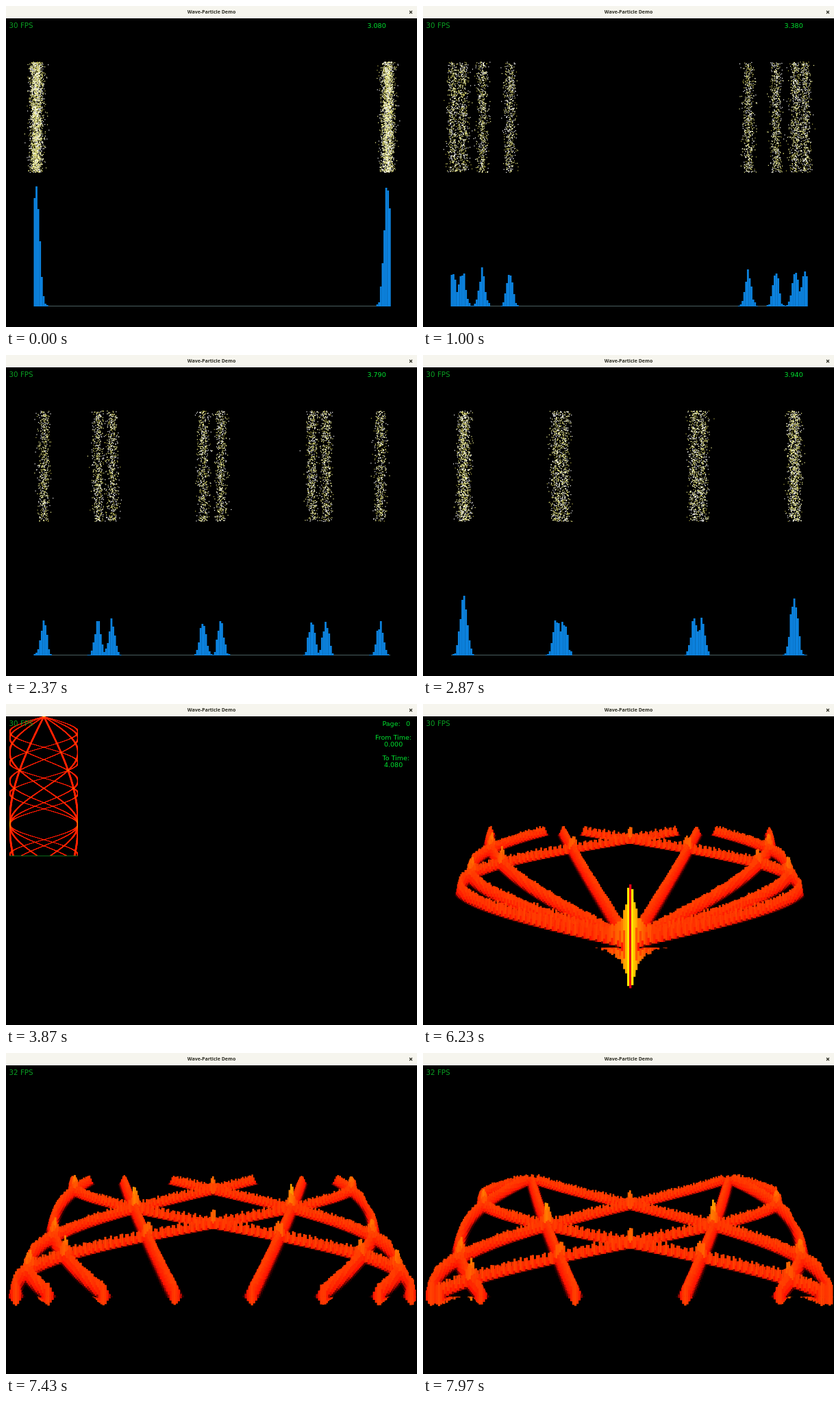
Write an HTML page with a canvas that moves like this. It is 600 by 468 pixels and loops after 8 s.

```html
<!DOCTYPE html>
<html lang="en">
<head>
<meta charset="utf-8">
<title>Wave-Particle Demo</title>
<style>
  html, body { margin: 0; width: 100%; height: 100%; overflow: hidden; background: #000; }
  canvas { display: block; }
</style>
</head>
<body>
<canvas id="stage" width="600" height="468"></canvas>
<script>
const ctx = document.getElementById('stage').getContext('2d');
const LOOP = 8000, FRAME = 1000 / 30;
const PAGE_START = 101, RELIEF_START = 187;   // frames at which the view switches
const MODES = [0.5, 1.5, 2.5, 3.5];
const BINS = 200, PAGE_ROWS = 408, RELIEF_ROWS = 99;
const LIME = '#0a9c22', GREEN = '#00e430';

function randomizer(seed) {
  let a = seed * 2654435761 | 0;
  return () => {
    a = a + 0x6D2B79F5 | 0;
    let t = Math.imul(a ^ a >>> 15, a | 1);
    t ^= t + Math.imul(t ^ t >>> 7, t | 61);
    return ((t ^ t >>> 14) >>> 0) / 4294967296;
  };
}

// Positions of the eight streams at time t, in the range -1 to 1
const streams = t => MODES.flatMap(k => [-Math.sin(k * t), Math.sin(k * t)]);

// Density over all bins for one time row; a lone stream peaks near 1
const rowCache = [];
function densityRow(row) {
  if (rowCache[row]) return rowCache[row];
  const centers = streams(row * 0.01), random = randomizer(row + 900);
  return rowCache[row] = Array.from({ length: BINS }, (_, b) => {
    const u = (b - BINS / 2) / (BINS / 2);
    let sum = 0;
    for (const c of centers) sum += Math.exp(-(((u - c) / 0.016) ** 2) / 2);
    return sum * (0.9 + 0.2 * random());
  });
}

function heat(density) {
  if (density > 7.3) return '#e60018';
  const light = Math.min(1, density / 0.25);
  const green = 255 * Math.tanh(density / 4);
  return `rgb(${255 * light | 0},${green * light | 0},0)`;
}

function text(string, x, y, color, size = 9.5) {
  ctx.font = `${size}px "DejaVu Sans", sans-serif`;
  ctx.textAlign = 'left';
  ctx.fillStyle = color;
  ctx.fillText(string, x, y);
}

function titleBar() {
  ctx.fillStyle = '#f6f5ee';
  ctx.fillRect(0, 0, 600, 18);
  ctx.fillStyle = '#2a2a20';
  ctx.font = '700 7px "Noto Sans", sans-serif';
  ctx.textAlign = 'center';
  ctx.fillText('Wave-Particle Demo', 300, 11.3);
  ctx.lineWidth = 1.1;
  ctx.strokeStyle = '#2a2a20';
  ctx.beginPath();
  ctx.moveTo(589, 7); ctx.lineTo(593, 11);
  ctx.moveTo(593, 7); ctx.lineTo(589, 11);
  ctx.stroke();
}

function particles(frame) {
  const time = 3.08 + frame * 0.01, random = randomizer(frame + 1);
  const counts = new Array(BINS).fill(0), binWidth = 2.605;
  for (const c of streams(time)) {
    for (let i = 0; i < 600; i++) {
      const spread = Math.sqrt(-2 * Math.log(1 - random())) * Math.cos(2 * Math.PI * random());
      const x = 300.5 + 259 * c + 4.4 * spread;
      const bin = Math.floor((x - 40.5) / binWidth);
      if (bin >= 0 && bin < BINS) counts[bin]++;
      const tint = random();
      ctx.fillStyle = tint < 0.4 ? '#ffffff' : tint < 0.75 ? '#ffff9c' : '#b4ae48';
      ctx.fillRect(x, 81 + 161 * random(), 1.2, 1.2);
    }
  }
  ctx.fillStyle = '#4a5f60';
  ctx.fillRect(41, 437, 520, 1);
  ctx.fillStyle = '#0c82de';
  counts.forEach((count, b) => {
    const h = Math.round(count * 0.35);
    if (h) ctx.fillRect(40.5 + b * binWidth, 438 - h, binWidth + 0.2, h);
  });
  text(time.toFixed(3), 527.5, 31.5, GREEN);
}

function page() {
  for (let y = 0; y < PAGE_ROWS / 2; y++) {
    const a = densityRow(2 * y), b = densityRow(2 * y + 1);
    for (let x = 0; x < BINS / 2; x++) {
      const d = (a[2 * x] + a[2 * x + 1] + b[2 * x] + b[2 * x + 1]) / 4;
      if (d < 0.1) continue;
      ctx.fillStyle = heat(d * 0.8);
      ctx.fillRect(5 + x, 18 + y, 1, 1);
    }
  }
  ctx.fillStyle = '#0b6a18';
  ctx.fillRect(5, 221, 100, 1);
  text('Page:', 549.5, 31.5, GREEN);
  text('0', 584, 31.5, GREEN);
  text('From Time:', 539, 51.5, GREEN);
  text('0.000', 552, 61.5, GREEN);
  text('To Time:', 549.5, 81.5, GREEN);
  text('4.080', 552, 91.5, GREEN);
}

// Screen height of the plane at a given row in perspective
const planeY = row => 1160 / (2.2 + row * 0.01) - 172;

// Bars reach above and below an opaque black plane, painted from far to near
function relief(frame) {
  const first = Math.round((frame - RELIEF_START) * 1.06), edge = planeY(0);

  function eachBar(rows, paint) {
    for (let row = rows; row >= 0; row--) {
      const scale = 2.2 / (2.2 + row * 0.01), width = 2.97 * scale;
      densityRow(first + row).forEach((density, b) => {
        if (density < 0.02) return;
        ctx.fillStyle = heat(density);
        const height = 100 * Math.tanh(density / 5) * scale;
        paint(row, 301 + (b - BINS / 2) * width, width + 0.4, height);
      });
    }
  }

  // Below the plane only what hangs past its front edge is seen
  eachBar(RELIEF_ROWS, (row, x, width, height) => {
    const bottom = planeY(row) + 0.64 * height;
    if (bottom > edge) ctx.fillRect(x, edge, width, bottom - edge);
  });
  eachBar(RELIEF_ROWS, (row, x, width, height) => {
    const top = planeY(row) - height;
    ctx.fillRect(x, top, width, Math.min(edge + 1, planeY(row - 0.5)) - top);
  });
}

function draw(frame) {
  ctx.fillStyle = '#000';
  ctx.fillRect(0, 0, 600, 468);
  if (frame < PAGE_START) particles(frame);
  else if (frame < RELIEF_START) page();
  else relief(frame);
  const fps = frame < 197 ? 30 : frame < 222 ? 31 : 32;
  text(fps + ' FPS', 4.5, 31.5, LIME, 10.3);
  titleBar();
}

let shown = -1;
function tick() {
  const frame = Math.floor((performance.now() % LOOP + 4) / FRAME) % 240;
  if (frame !== shown) draw(shown = frame);
  requestAnimationFrame(tick);
}
tick();
</script>
</body>
</html>
```
